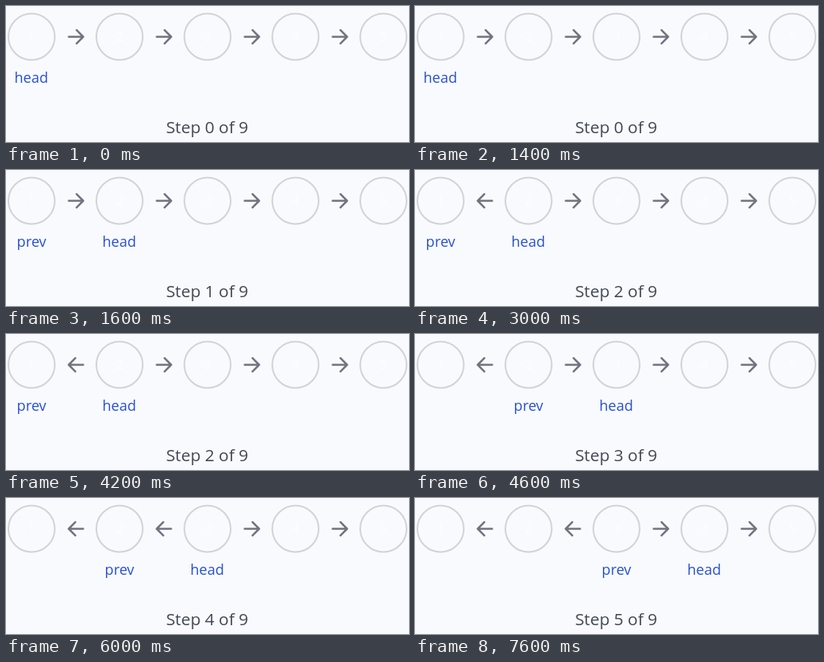
Write an HTML page with a canvas that moves like this. It is 504x170 px and loops after 8000 ms.

```html
<!DOCTYPE html>
<html lang="en">
<head>
<meta charset="utf-8">
<title>Reversing a linked list</title>
<style>
  html, body { margin: 0; width: 100%; height: 100%; overflow: hidden; background: #f8fafe; }
  canvas, svg { position: absolute; left: 0; top: 0; width: 504px; height: 170px; }
  text { font-family: "Open Sans", "Noto Sans", sans-serif; text-anchor: middle; }
  .value { font-size: 16px; fill: #fdfdff; }
  .label { font-size: 18px; fill: #2850d0; }
  .step { font-size: 20.8px; fill: #404753; }
</style>
</head>
<body>
<canvas id="shapes"></canvas>
<svg id="words" viewBox="0 0 504 170"></svg>
<script>
const W = 504, H = 170, LOOP = 8000;
const NODES = 5, GAP = 110, FIRST_X = 32, MID_Y = 38.5;
const STEP_TIMES = [0, 1600, 3000, 4600, 6000, 7600];

const canvas = document.getElementById("shapes");
const words = document.getElementById("words");
const ctx = canvas.getContext("2d");
const scale = window.devicePixelRatio || 1;
canvas.width = W * scale;
canvas.height = H * scale;
ctx.scale(scale, scale);

const nodeX = i => FIRST_X + i * GAP;

function addText(cls, x, y, content = "") {
  const el = document.createElementNS("http://www.w3.org/2000/svg", "text");
  el.setAttribute("class", cls);
  el.setAttribute("x", x);
  el.setAttribute("y", y);
  el.textContent = content;
  words.append(el);
  return el;
}

for (let i = 0; i < NODES; i++) addText("value", nodeX(i), 44, i + 1);
const prev = addText("label", 0, 96, "prev");
const head = addText("label", 0, 96, "head");
const caption = addText("step", 251.6, 158.5);

function drawNode(x) {
  ctx.strokeStyle = "#d1d3d8";
  ctx.lineWidth = 2;
  ctx.beginPath();
  ctx.arc(x, MID_Y, 29, 0, Math.PI * 2);
  ctx.stroke();
}

function drawArrow(x, dir) {
  ctx.save();
  ctx.translate(x, MID_Y);
  ctx.scale(dir, 1);
  ctx.strokeStyle = "#71747f";
  ctx.lineWidth = 2.5;
  ctx.lineCap = ctx.lineJoin = "round";
  ctx.beginPath();
  ctx.moveTo(-9, 0);
  ctx.lineTo(9, 0);
  ctx.moveTo(0.8, -8.3);
  ctx.lineTo(9.1, 0);
  ctx.lineTo(0.8, 8.3);
  ctx.stroke();
  ctx.restore();
}

// Odd steps advance the pointers, even steps flip the link behind head.
function render(step) {
  const headAt = Math.ceil(step / 2);
  const reversed = Math.floor(step / 2);

  ctx.clearRect(0, 0, W, H);
  for (let i = 0; i < NODES; i++) {
    drawNode(nodeX(i));
    if (i < NODES - 1) drawArrow(nodeX(i) + GAP / 2 + 0.5, i < reversed ? -1 : 1);
  }

  head.setAttribute("x", nodeX(headAt) - 0.4);
  prev.setAttribute("x", nodeX(headAt - 1));
  prev.style.display = headAt > 0 ? "" : "none";
  caption.textContent = `Step ${step} of 9`;
}

let shown = -1;
function tick() {
  const t = performance.now() % LOOP;
  const step = STEP_TIMES.filter(start => start <= t).length - 1;
  if (step !== shown) render(shown = step);
  requestAnimationFrame(tick);
}
tick();
</script>
</body>
</html>
```
